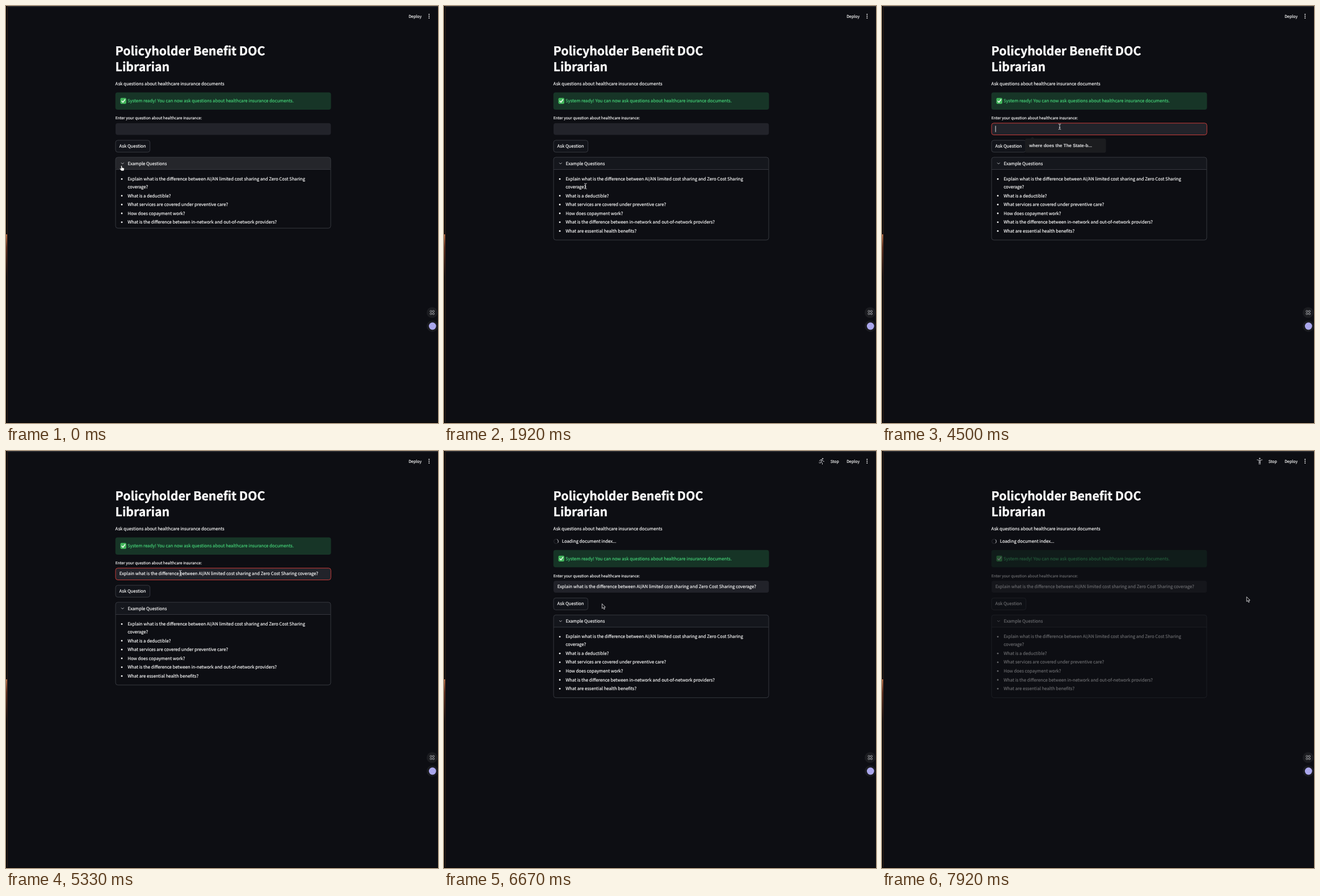
An HTML page that plays this animation: 761x736 px, repeating every 8000 ms.

```html
<!DOCTYPE html>
<html lang="en">
<head>
<meta charset="utf-8">
<title>Question assistant</title>
<style>
  html, body { margin: 0; width: 100%; height: 100%; overflow: hidden; background: #0d0e13; }
  svg { display: block; }
  text {
    font: 7.735px "Noto Sans CJK JP", "Noto Sans CJK SC", "Noto Sans CJK", "Open Sans", sans-serif;
    fill: #fafafa; stroke: #fafafa; stroke-width: .16px;
    text-rendering: geometricPrecision; white-space: pre;
  }
  .title { font-size: 21.27px; font-weight: 700; stroke-width: .4px; }
  .small { font-size: 6.8px; }
  .menu { font-size: 7px; }
  .ok { fill: #45d378; stroke: #45d378; }
  .hint { font: bold 8px "Liberation Sans", Arial, sans-serif; fill: #e4e4e6; stroke: none; }
  .line { fill: none; stroke: #d0d0d4; stroke-width: .9; stroke-linecap: round; stroke-linejoin: round; }
  .box { stroke: #36383f; stroke-width: 1; }
</style>
</head>
<body>
<svg width="761" height="736" viewBox="0 0 761 736">
  <defs>
    <linearGradient id="glow" x2="0" y2="1">
      <stop stop-color="#b9714a"/><stop offset=".3" stop-color="#5c2c1b"/><stop offset="1" stop-color="#08080a"/>
    </linearGradient>
    <clipPath id="clip"><rect id="clipBox" x="192" y="266" width="382" height="147"/></clipPath>
  </defs>

  <!-- window edges -->
  <rect width="761" height="1.5" fill="#2e2f34"/>
  <rect width="2" height="736" fill="#08080a"/>
  <rect y="403" width="2" height="75" fill="url(#glow)"/>
  <rect x="2" y="1" width="1" height="735" fill="#35211a"/>
  <rect y="735" width="761" height="1" fill="#050507"/>

  <!-- top bar -->
  <g id="status">
    <g class="line" stroke-width="1.1">
      <g id="runner">
        <circle cx="667" cy="13.6" r=".8" fill="#d0d0d4"/>
        <path d="M661.5 18l1.3-2.3 3-.3 1.5 2.4 2.2.6M665.5 15.5l-1.2 3.7 2.2 1.8v2.6M664.3 19.2l-1 2-2.6-.5"/>
      </g>
      <g id="standing">
        <circle cx="665.3" cy="13.2" r=".8" fill="#d0d0d4"/>
        <path d="M660.8 15.6l3 .7h3l3-.7M664.3 16.4v7M666.3 16.4v7M664.3 19.6h2"/>
      </g>
    </g>
    <text class="menu" x="680.8" y="20.6">Stop</text>
  </g>
  <text class="menu" x="709.3" y="20.6">Deploy</text>
  <g fill="#fafafa"><circle cx="745.3" cy="14.8" r=".95"/><circle cx="745.3" cy="18" r=".95"/><circle cx="745.3" cy="21.2" r=".95"/></g>

  <text class="title" x="192.6" y="86.6">Policyholder Benefit DOC</text>
  <text class="title" x="192.6" y="115.2">Librarian</text>
  <text x="192.6" y="139.6">Ask questions about healthcare insurance documents</text>

  <g id="loading">
    <circle cx="197.5" cy="159.5" r="4" fill="none" stroke="#2b2c32"/>
    <path id="spinner" d="M200.3 156.7a4 4 0 0 1 0 5.6" class="line"/>
    <text x="207.8" y="162">Loading document index...</text>
  </g>

  <g id="form">
    <rect x="192.7" y="152.4" width="379.8" height="30.5" rx="4" fill="#173527"/>
    <rect x="201.5" y="162.3" width="10.4" height="10.4" rx="2" fill="#43b85c"/>
    <path d="M204 167.8l2 2.2 3.6-5" class="line" style="stroke:#fff;stroke-width:1.3"/>
    <text class="ok" x="214" y="170.3">System ready! You can now ask questions about healthcare insurance documents.</text>

    <text class="small" x="192.7" y="200.2">Enter your question about healthcare insurance:</text>
    <rect id="field" x="193" y="206.7" width="379.3" height="20.8" rx="4" fill="#22232a"/>
    <text id="typed" x="199.7" y="219.4">Explain what is the difference between AI/AN limited cost sharing and Zero Cost Sharing coverage?</text>
    <rect id="caret" x="199.6" y="211.5" width=".9" height="11" fill="#fafafa"/>

    <rect id="button" class="box" x="193" y="237" width="60.6" height="21" rx="4"/>
    <text x="199.4" y="250">Ask Question</text>

    <rect id="header" x="193" y="267" width="379" height="21.5" rx="4"/>
    <path d="M203.3 276.9l2 2 2-2" class="line"/>
    <text x="214.6" y="280.6">Example Questions</text>
    <path d="M193 288.5h379" class="box"/>
    <rect id="panel" class="box" x="193" y="267" width="379" height="146" rx="4" fill="none"/>
    <g id="selection" fill="#754a34"><rect id="select1" y="298.8" height="13.4"/><rect id="select2" y="312.6" height="13.4"/></g>
    <g id="list" clip-path="url(#clip)"></g>
  </g>

  <g id="toolbar">
    <rect x="167" y="288" width="97" height="14.5" rx="5" fill="#191a1f"/>
    <g class="line">
      <path d="M173.6 296.4l4-4.6 2 1.8-4 4.4-2.4.4z"/>
      <path d="M172 299.4h8" style="stroke:#e0a64a"/>
      <rect x="191" y="291.2" width="7.6" height="7.8" rx="1.6"/>
      <path d="M193 293.7h.2M195 293.7h2M193 296.5h.2M195 296.5h2M209.7 292.6h4.6M212 291.3v1.3M210.2 296.4q2.6-1 3-3.8M210.8 294q1 1.8 2.6 2.2M213.4 299.3l2-4.6 2 4.6M214.2 297.9h2.5"/>
      <path d="M221 294.5l1.2 1.2 1.2-1.2" stroke-opacity=".3"/>
    </g>
    <g fill="#e0e0e4"><circle cx="235" cy="291.8" r=".9"/><circle cx="235" cy="295" r=".9"/><circle cx="235" cy="298.2" r=".9"/></g>
    <circle cx="253.8" cy="295.2" r="4.6" fill="#6459c9"/>
  </g>

  <g id="hint">
    <path d="M261 234.5l4-3.5 4 3.5z" fill="#1b1c1f"/>
    <rect x="252" y="234" width="142.5" height="25" rx="3" fill="#1b1c1f"/>
    <text class="hint" x="259.3" y="249.3">where does the The State-b...</text>
  </g>

  <!-- floating buttons -->
  <circle cx="750.6" cy="541" r="9.6" fill="#1b1c20"/>
  <g class="line" style="stroke:#a2a3a8">
    <circle cx="748.5" cy="538.8" r="1.6"/><circle cx="752.9" cy="538.8" r="1.6"/>
    <circle cx="748.5" cy="543.2" r="1.6"/><circle cx="752.9" cy="543.2" r="1.6"/>
  </g>
  <circle cx="751" cy="565" r="10" fill="#1b1c20"/>
  <circle cx="751.3" cy="565" r="6.4" fill="#aaa7ec"/>

  <!-- pointers, each with its hot spot at 0,0 -->
  <g id="pointer">
    <path id="hand" d="M-1 1Q0-.6 1 1V3.6L4 4.4Q5.2 5 4.8 6.6L4 9.4H-.4L-3.2 6Q-3.4 4.6-1.8 5L-1 5.6z" fill="#fff" stroke="#111" stroke-width=".6"/>
    <path id="arrow" d="M0 0V8.4L2 6.7 3.4 9.9 4.9 9.2 3.5 6.1H6z" fill="#101014" stroke="#e8e8ea" stroke-width=".8" stroke-linejoin="round"/>
    <path id="beam" d="M-2.2-4.8Q-.3-4.8 0-3.8 .3-4.8 2.2-4.8M0-3.8V3.8M-2.2 4.8Q-.3 4.8 0 3.8 .3 4.8 2.2 4.8M-1.2 1.5h2.4" fill="none" stroke="#e4e4e6" stroke-width=".9"/>
  </g>
</svg>
<script>
const LOOP = 8000;
const $ = id => document.getElementById(id);
const set = (id, attrs) => { for (const key in attrs) $(id).setAttribute(key, attrs[key]); };
const show = (id, on) => { $(id).style.display = on ? '' : 'none'; };
const clamp = v => Math.min(1, Math.max(0, v));
const progress = (t, from, to) => clamp((t - from) / (to - from));
const smooth = p => p * p * (3 - 2 * p);

const questions = [
  [308, 'Explain what is the difference between AI/AN limited cost sharing and Zero Cost Sharing'],
  [321.8, 'coverage?', true],
  [337.5, 'What is a deductible?'],
  [353.1, 'What services are covered under preventive care?'],
  [368.6, 'How does copayment work?'],
  [384.2, 'What is the difference between in-network and out-of-network providers?'],
  [399.8, 'What are essential health benefits?'],
];
$('list').innerHTML = questions.map(([y, line, continued]) =>
  `<text x="214.3" y="${y}">${line}</text>` +
  (continued ? '' : `<circle cx="204" cy="${y - 2.6}" r="1.4" fill="#fafafa"/>`)).join('');

// time, x, y of the pointer
const path = [
  [0, 203.5, 281.5], [830, 203.5, 281.5], [1750, 249.3, 318], [2050, 249.3, 318],
  [2950, 217, 310], [3500, 217, 310], [4250, 313, 213], [5200, 313, 213],
  [6050, 220, 254.5], [6420, 220, 254.5], [7170, 443.8, 312.3], [7920, 642.3, 257.3], [LOOP, 642.3, 257.3],
];
const shapes = [[0, 'hand'], [1050, 'arrow'], [1330, 'beam'], [3720, 'hand'], [3880, 'arrow'],
  [4170, 'beam'], [5500, 'arrow'], [5720, 'hand'], [6560, 'arrow']];

function pointerAt(t) {
  const i = path.findIndex(p => p[0] > t);
  const [t0, x0, y0] = path[i - 1], [t1, x1, y1] = path[i];
  const p = smooth(progress(t, t0, t1));
  return [x0 + (x1 - x0) * p, y0 + (y1 - y0) * p];
}

function drawSelection(t, x, y) {
  const selecting = t >= 2050 && t < 4330;
  show('selection', selecting);
  if (!selecting) return;
  const start = t > 2900 ? 214.3 : x;
  const onFirst = t > 2900 || y < 312.5;
  const second = onFirst ? 214.3 : start;
  set('select1', { x: start, width: onFirst ? 528 - start : 0 });
  set('select2', { x: second, width: Math.max(0, 250.3 - second) });
}

function draw(t) {
  const [x, y] = pointerAt(t);
  const shape = shapes.filter(s => s[0] <= t).pop()[1];
  set('pointer', { transform: `translate(${x} ${y})` });
  for (const id of ['hand', 'arrow', 'beam']) show(id, id === shape);

  const open = 125 + 21 * (1 - (1 - progress(t, 0, 500)) ** 3);
  set('panel', { height: open });
  set('clipBox', { height: open });

  const busy = t >= 6580;
  const within = (left, top, right, bottom) => !busy && x > left && x < right && y > top && y < bottom;
  set('header', { fill: within(193, 267, 572, 288) ? '#25262b' : '#15171d' });
  set('button', { fill: within(193, 237, 254, 258) ? '#26272d' : '#12141a' });
  drawSelection(t, x, y);

  const focused = t >= 4330 && t < 6080, pasted = t >= 5000;
  set('field', { stroke: focused ? '#c43b38' : 'none' });
  show('caret', focused && !pasted && (t - 4330) % 1000 < 500);
  show('typed', pasted);
  show('toolbar', t >= 3500 && t < 4330);
  show('hint', t >= 4400 && !pasted);

  show('status', t >= 6500);
  const running = Math.floor((t - 6500) / 250) % 2 === 0;
  show('runner', running);
  show('standing', !running);
  show('loading', busy);
  set('spinner', { transform: `rotate(${(t - 7920) * .3} 197.5 159.5)` });
  set('form', {
    transform: `translate(0 ${busy ? 22.4 : 0})`,
    opacity: 1 - .62 * progress(t, 6650, 7650),
  });
}

const began = performance.now();
function tick() {
  draw((performance.now() - began) % LOOP);
  requestAnimationFrame(tick);
}
tick();
</script>
</body>
</html>
```
